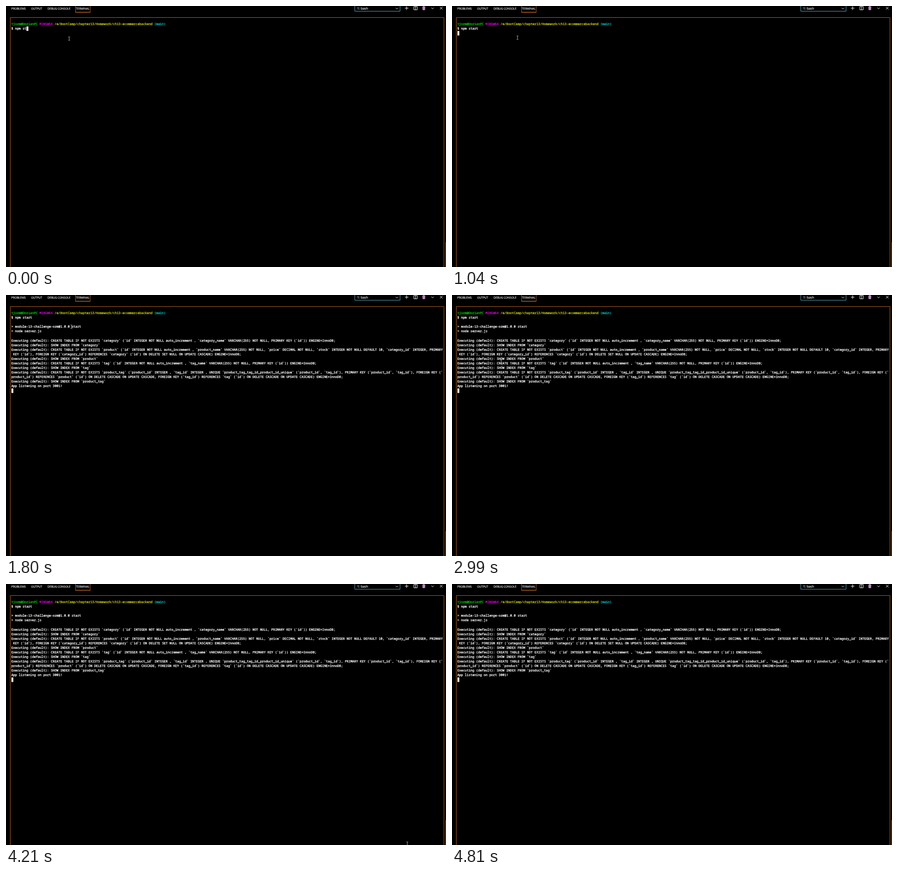
Write an HTML page that moves like this. It is 972 by 576 pixels and loops after 5.71 s.

```html
<!DOCTYPE html>
<html lang="en">
<head>
<meta charset="utf-8">
<title>Terminal</title>
<style>
  html, body { margin: 0; height: 100%; overflow: hidden; background: #000; }
  svg { display: block; width: 972px; height: 576px; fill: none; }
  text { fill: currentColor; stroke: currentColor; color: #fff; white-space: pre; text-rendering: geometricPrecision; }
  .ui { font: 6.2px "Open Sans", "Noto Sans", sans-serif; stroke-width: .15; }
  .shell { font: 6.94px "Noto Sans Mono", "DejaVu Sans Mono", monospace; stroke-width: .32; }
  .focus { stroke: #b9651a; }
  .icon { stroke: #fff; }
</style>
</head>
<body>
<svg viewBox="0 0 972 576">
  <g class="ui">
    <text x="11.7" y="7.8">PROBLEMS</text>
    <text x="55.5" y="7.8">OUTPUT</text>
    <text x="91.7" y="7.8">DEBUG CONSOLE</text>
    <text x="154.6" y="7.8">TERMINAL</text>
    <text x="775.8" y="8.3" style="font-size:7.2px">1: bash</text>
  </g>
  <path class="focus" d="M153.5 0V13.5H186V0M153 14H186.5"/>
  <path class="focus" d="M9.5 576V25.5H967.5V576"/>
  <path stroke="#5fa8c0" d="M770.5 0V11.5H870.5V0"/>
  <path stroke="#4f8799" d="M971.5 521V576"/>
  <g class="icon">
    <path d="M861 4.2l2.6 2.6 2.6-2.6M939.6 3.7l2.7 2.7 2.7-2.7"/>
    <path d="M881 4.8h8M885 .8v8M958.7 2l5.6 5.6M964.3 2l-5.6 5.6"/>
    <path d="M901 1h7.4v7.4h-7.4zM904.7 1v7.4"/>
    <path stroke="#d9a3d9" fill="#8d648f" d="M919.6 2.3h6.8M921.8 2V.9h2.4V2M920.5 2.5l.3 6h4.4l.3-6M922.2 3.6v3.8M923.8 3.6v3.8"/>
  </g>
  <g id="shell" class="shell"></g>
  <rect id="caret" width="4.15" height="10" fill="#fff"/>
  <path id="mouse" stroke="#ccc" stroke-width=".9" d="M-2-4h1.4l.6.6.6-.6H2M0-3.4V3.4M-2 4h1.4l.6-.6.6.6H2"/>
</svg>
<script>
const LOOP = 5710, LEFT = 11.7, CELL = 4.157, ROW = 10.08;
const $ = id => document.getElementById(id);
const svgEl = name => document.createElementNS("http://www.w3.org/2000/svg", name);
const log = sql => "Executing (default): " + sql;
const create = sql => log("CREATE TABLE IF NOT EXISTS " + sql);
const index = table => log("SHOW INDEX FROM `" + table + "`");

// [time shown, first row, lines]
const blocks = [
  [1340, 3, [
    "> module-13-challenge-orm@1.0.0 start",
    "> node server.js"]],
  [1800, 6, [
    create("`category` (`id` INTEGER NOT NULL auto_increment , `category_name` VARCHAR(255) NOT NULL, PRIMARY KEY (`id`)) ENGINE=InnoDB;"),
    index("category"),
    create("`product` (`id` INTEGER NOT NULL auto_increment , `product_name` VARCHAR(255) NOT NULL, `price` DECIMAL NOT NULL, `stock` INTEGER NOT NULL DEFAULT 10, `category_id` INTEGER, PRIMARY"),
    " KEY (`id`), FOREIGN KEY (`category_id`) REFERENCES `category` (`id`) ON DELETE SET NULL ON UPDATE CASCADE) ENGINE=InnoDB;",
    index("product"),
    create("`tag` (`id` INTEGER NOT NULL auto_increment , `tag_name` VARCHAR(255) NOT NULL, PRIMARY KEY (`id`)) ENGINE=InnoDB;"),
    index("tag"),
    create("`product_tag` (`product_id` INTEGER , `tag_id` INTEGER , UNIQUE `product_tag_tag_id_product_id_unique` (`product_id`, `tag_id`), PRIMARY KEY (`product_id`, `tag_id`), FOREIGN KEY (`"),
    "product_id`) REFERENCES `product` (`id`) ON DELETE CASCADE ON UPDATE CASCADE, FOREIGN KEY (`tag_id`) REFERENCES `tag` (`id`) ON DELETE CASCADE ON UPDATE CASCADE) ENGINE=InnoDB;",
    index("product_tag"),
    "App listening on port 3001!"]]
];

// [time, column, row]
const caretStops = [[0, 8, 1], [150, 9, 1], [300, 10, 1], [460, 11, 1],
  [610, 0, 2], [1340, 0, 6], [1800, 0, 17]];
// [time, x, y]; a stop without a place hides the pointer
const mouseStops = [[0, 139.5, 72], [1040, 144.7, 70], [2990, 108.5, 147],
  [3140, 53.5, 193], [3290, 144.5, 200], [3440, 97.5, 201], [3590, 167.5, 210],
  [3740, 138.5, 212], [3910], [4060, 155, 270], [4210, 886.5, 573],
  [4360, 888.5, 573], [4510, 911.5, 571], [4660, 945.5, 574], [4810]];

function addText(parent, str, col, row, color = "#fff") {
  const el = svgEl("text");
  el.setAttribute("x", LEFT + col * CELL);
  el.setAttribute("y", 42.1 + row * ROW);
  el.style.color = color;
  el.textContent = str;
  return parent.appendChild(el);
}

const shell = $("shell");
addText(shell, "tjorm@DorianPC", 0, 0, "#00cd00");
addText(shell, "MINGW64", 15, 0, "#cd00cd");
addText(shell, "/e/BootCamp/chapter13/Homework/ch13-ecommercebackend", 23, 0, "#cdcd00");
addText(shell, "(main)", 76, 0, "#00cdcd");
const command = addText(shell, "", 0, 1);
const output = blocks.map(([at, row, lines]) => {
  const group = shell.appendChild(svgEl("g"));
  lines.forEach((line, i) => addText(group, line, 0, row + i));
  return { at, group };
});

const current = (stops, t) => stops.findLast(s => s[0] <= t);

function draw(now) {
  const t = now % LOOP;
  const [, col, row] = current(caretStops, t);
  command.textContent = "$ npm start".slice(0, row === 1 ? col : undefined);
  $("caret").setAttribute("x", LEFT + .3 + col * CELL);
  $("caret").setAttribute("y", 34.9 + row * ROW);
  for (const { at, group } of output) group.style.display = t < at ? "none" : "";
  const [, x, y] = current(mouseStops, t);
  $("mouse").style.display = x ? "" : "none";
  if (x) $("mouse").setAttribute("transform", `translate(${x} ${y})`);
}

const start = performance.now();
(function tick() {
  draw(performance.now() - start);
  requestAnimationFrame(tick);
})();
</script>
</body>
</html>
```
